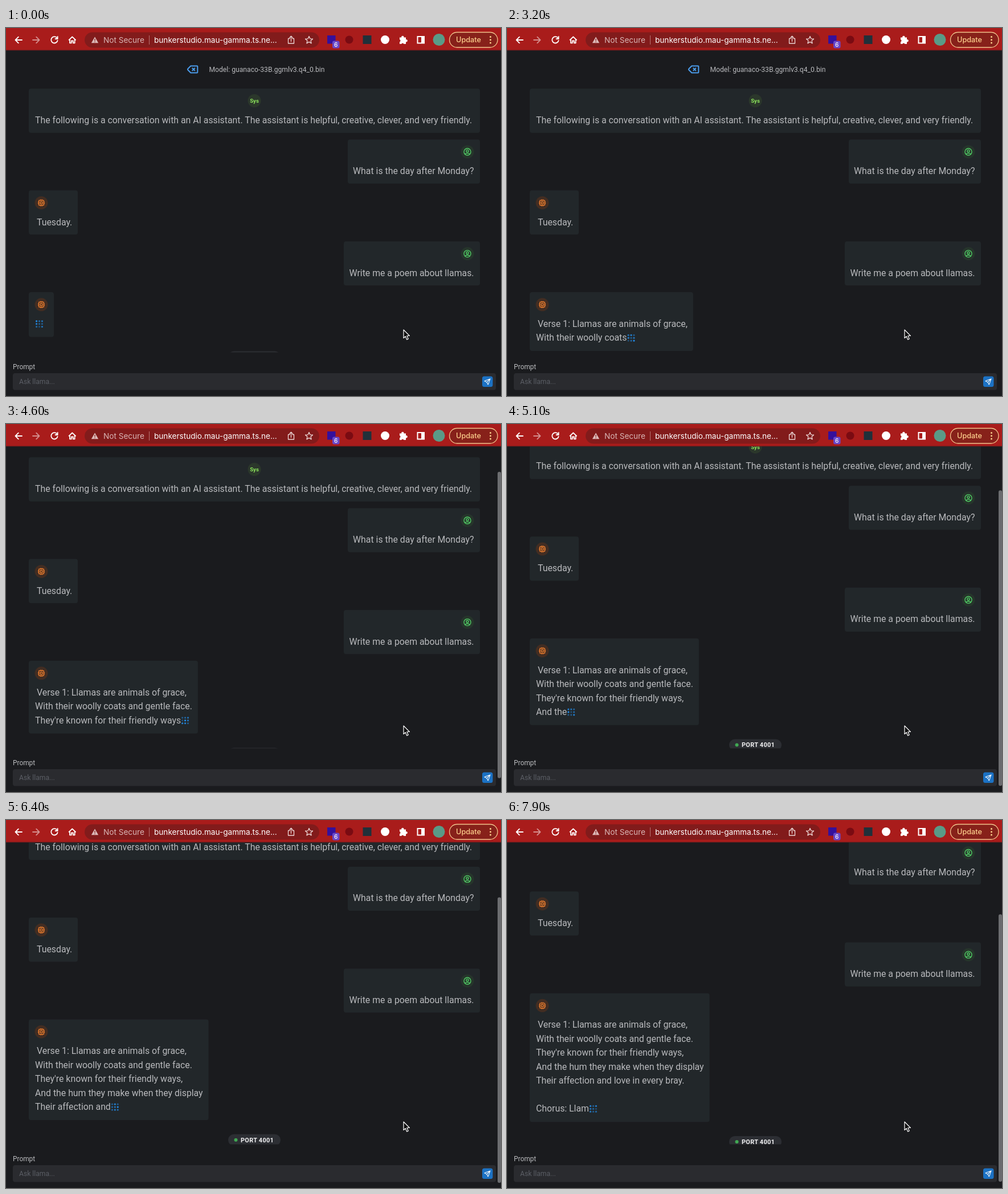
These frames come from a looping animation (869 px wide and 645 px high, 8000 ms). An HTML page:

```html
<!DOCTYPE html>
<html lang="en">
<head>
<meta charset="utf-8">
<title>Chat</title>
<style>
  html, body { margin: 0; width: 100%; height: 100%; overflow: hidden; background: #1a1b1e; }
  svg { display: block; width: 869px; height: 645px; }
  text { font-family: Roboto, "Noto Sans", sans-serif; font-size: 15.84px; fill: #b9babd; }
  .bar text { font-family: Inter, sans-serif; font-size: 13.6px; fill: #fff; }
  .bubble { fill: #22272a; }
  .icon { fill: none; stroke-width: 2; stroke-linecap: round; stroke-linejoin: round; }
  .bar .icon { stroke: #fff; stroke-width: 1.8; }
  .small { font-size: 12.15px; }
</style>
</head>
<body>
<svg viewBox="0 0 869 645">
  <defs>
    <clipPath id="view"><rect y="39" width="869" height="529.5"/></clipPath>
    <g id="user">
      <circle r="11.5" fill="#26352b"/>
      <g class="icon" stroke="#51cf66" transform="scale(.67) translate(-12 -12)">
        <circle cx="12" cy="12" r="9"/><circle cx="12" cy="10" r="3"/>
        <path d="M6.2 18.8A4 4 0 0 1 10 16h4a4 4 0 0 1 3.8 2.9"/>
      </g>
    </g>
    <g id="bot">
      <circle r="11.5" fill="#422d22"/>
      <g class="icon" stroke="#f5822f" transform="scale(.62) translate(-12 -12)">
        <rect x="5" y="5" width="14" height="14" rx="1"/>
        <path d="M9 9h6v6H9zM3 10h2M3 14h2M10 3v2M14 3v2M21 10h-2M21 14h-2M14 21v-2M10 21v-2"/>
      </g>
    </g>
  </defs>

  <rect width="869" height="645" fill="#1a1b1e"/>

  <g clip-path="url(#view)">
    <g id="chat">
      <path class="icon" stroke="#4a9bea" transform="translate(315.3 60.5)"
        d="M20 6a1 1 0 0 1 1 1v10a1 1 0 0 1-1 1H9l-5-5a1.5 1.5 0 0 1 0-2l5-5zM12 10l4 4m0-4l-4 4"/>
      <text class="small" x="356.5" y="76.5">Model: guanaco-33B.ggmlv3.q4_0.bin</text>

      <rect class="bubble" x="40" y="106.3" width="792" height="77.4" rx="4"/>
      <circle cx="436" cy="127.5" r="11.5" fill="#2b372b"/>
      <text x="436" y="131" text-anchor="middle" style="font-size:9.6px;font-weight:700;fill:#8ce65c">Sys</text>
      <text x="51" y="166.7">The following is a conversation with an AI assistant. The assistant is helpful, creative, clever, and very friendly.</text>

      <rect class="bubble" x="600" y="195.5" width="232" height="77.2" rx="4"/>
      <use href="#user" x="810" y="217"/>
      <text x="821.5" y="256.1" text-anchor="end">What is the day after Monday?</text>

      <rect class="bubble" x="40" y="284.6" width="86" height="77.4" rx="4"/>
      <use href="#bot" x="62" y="306.4"/>
      <text x="54" y="345.5">Tuesday.</text>

      <rect class="bubble" x="593" y="374" width="239" height="77.2" rx="4"/>
      <use href="#user" x="810" y="395.6"/>
      <text x="821.5" y="434.8" text-anchor="end">Write me a poem about llamas.</text>

      <rect class="bubble" id="reply" x="40" y="463.1" rx="4"/>
      <use href="#bot" x="62" y="484.8"/>
      <g id="poem"></g>
      <g id="loader" fill="#228be6"></g>

      <g id="badge">
        <rect x="390" width="92" height="20" rx="10" fill="#2c2e33"/>
        <circle cx="403.5" cy="10" r="3" fill="#40a853"/>
        <text x="412" y="13.8" style="font-size:10.9px;font-weight:700;letter-spacing:.3px;fill:#f1f1f2">PORT 4001</text>
      </g>
    </g>
  </g>

  <text x="12" y="597.6" style="font-size:11.9px">Prompt</text>
  <rect x="12" y="605" width="848" height="29.5" rx="4" fill="#2a2b2f"/>
  <text class="small" x="23" y="624" style="fill:#5b5e65">Ask llama...</text>
  <rect x="836" y="610.5" width="18.5" height="18.5" rx="3.5" fill="#1c72c4"/>
  <path class="icon" stroke="#fff" transform="translate(845.2 619.8) scale(.54) translate(-12 -12)"
    d="M10 14L21 3l-6.5 18a.55.55 0 0 1-1 0L10 14l-7-3.5a.55.55 0 0 1 0-1L21 3"/>
  <rect id="thumb" x="863" width="6" rx="3" fill="#6c6d70"/>

  <g class="bar">
    <rect width="869" height="39" fill="#a91c1b"/>
    <rect y="38.5" width="869" height="1" fill="#5e1d1e"/>
    <path class="icon" d="M28 21H16.5m5.3-5.3L16.5 21l5.3 5.3"/>
    <path class="icon" opacity=".5" d="M47 21h11.5m-5.3-5.3l5.3 5.3-5.3 5.3"/>
    <path class="icon" d="M89.6 17.5A5.7 5.7 0 1 0 90.5 22M90.6 15v4h-4"/>
    <path class="icon" d="M110.5 20.8l5.8-5.3 5.8 5.3M112 20v6.3h2.8V22.500h3v3.8h2.800V20"/>
    <rect x="138" y="7.500" width="412" height="27" rx="13.500" fill="#821b1b"/>
    <path d="M156 15.500l6.200 10.800h-12.400z" fill="#dcb9b8"/>
    <path d="M156 19v3.600m0 1.100v1.300" stroke="#821b1b" stroke-width="1.300"/>
    <text x="171" y="25.600" style="fill:#d9b6b5">Not Secure</text>
    <path d="M251.500 13v16" stroke="#b67370"/>
    <text x="260" y="25.600">bunkerstudio.mau-gamma.ts.ne...</text>
    <g class="icon" style="stroke-width:1.300;stroke:#ecd6d5">
      <path d="M498 18.500h-2.500v8.500h10v-8.500H503M500.500 23.500v-9m-2.700 2.500l2.700-2.700 2.700 2.700"/>
      <path d="M532 14.500l1.900 4.300 4.600.400-3.500 3.100 1.100 4.600-4.100-2.500-4.100 2.500 1.100-4.600-3.500-3.100 4.600-.400z"/>
    </g>
    <rect x="564" y="13" width="14.500" height="14.500" fill="#35109b"/>
    <rect x="573" y="22.500" width="12.500" height="13" rx="3" fill="#6947c9"/>
    <text x="579.200" y="32.600" text-anchor="middle" style="font-size:10px;font-weight:500">6</text>
    <circle cx="602.500" cy="20.500" r="7" fill="#7a0b12"/>
    <rect x="626.500" y="13" width="15" height="15" fill="#20303a"/>
    <circle cx="665.500" cy="20.500" r="7.500" fill="#fff"/>
    <path fill="#fff" d="M691 16.500h3.200a2.200 2.200 0 1 1 4.200 0h3.600v3.700a2.200 2.200 0 1 1 0 4.200v3.600h-3.600a2.200 2.200 0 0 0-4.200 0H691v-3.600a2.200 2.200 0 0 0 0-4.200z"/>
    <rect x="722.500" y="15" width="11.500" height="11.500" fill="none" stroke="#fff" stroke-width="2"/>
    <rect x="729" y="15" width="5" height="11.500" fill="#fff"/>
    <circle cx="760" cy="20.500" r="10.500" fill="#5a9a87"/>
    <rect x="778.500" y="7.500" width="84.500" height="26.500" rx="13.200" fill="#87211a" stroke="#f1c48c" stroke-width="1.300"/>
    <text x="790" y="25.300" style="font-size:12.700px;font-weight:500;fill:#fbcd8b">Update</text>
    <g fill="#fbcd8b">
      <circle cx="850.500" cy="15.500" r="1.500"/><circle cx="850.500" cy="20.700" r="1.500"/><circle cx="850.500" cy="25.900" r="1.500"/>
    </g>
  </g>

  <path d="M698 529v14.500l3.200-3 2.400 5.600 2.600-1.100-2.400-5.500h4.600z" fill="#0b0b0c" stroke="#fff" stroke-width="1.200" stroke-linejoin="round"/>
</svg>
<script>
const LOOP = 8000, PITCH = 24.5, REPLY_TOP = 463.1, VIEW = 606;
const NS = "http://www.w3.org/2000/svg";
const $ = id => document.getElementById(id);

function add(parent, tag, attrs) {
  const el = document.createElementNS(NS, tag);
  for (const k in attrs) el.setAttribute(k, attrs[k]);
  return parent.appendChild(el);
}

// Token bursts: start, step, tokens
const bursts = [
  [800, 155, "Verse| 1|:| L|lam|as| are"],
  [1880, 100, " animals| of| grace|,|\n"],
  [2480, 100, "With| their| wo|ol|ly| co"],
  [3180, 105, "ats| and| gent|le| face|."],
  [3960, 78, "\n|They|'|re| known| for| their| friendly| ways"],
  [4690, 100, ",|\n"],
  [4930, 118, "And| the| hum| they| make| when| they| display"],
  [5900, 100, "\n"],
  [6010, 104, "Their| aff|ection| and| love| in| every| br|ay"],
  [6980, 120, ".|\n|\n|Ch|orus"],
  [7590, 100, ":"],
  [7780, 100, " L|lam"]
];
const tokens = bursts.flatMap(([start, step, text]) =>
  text.split("|").map((word, i) => ({ at: start + i * step, word })));

// Smooth scrolls: start, from, to
const scrolls = [[4000, 0, 48], [4900, 48, 96], [6250, 96, 122], [7715, 122, 170]];
const SCROLL_MS = 350, HOLD = 700, FADE = 150;

const lineX = i => i ? 51 : 54;
const lines = Array.from({ length: 7 }, (_, i) =>
  add($("poem"), "text", { x: lineX(i), y: 523.9 + i * PITCH }));

// Phase of each dot, row by row
const dots = [0, 3, 8, 1, 6, 4, 7, 5, 2].map((phase, i) => ({
  phase: phase / 10,
  el: add($("loader"), "circle", { cx: 1.6 + i % 3 * 4.9, cy: 1.6 + Math.floor(i / 3) * 4.9, r: 1.6 })
}));

const clamp = v => Math.max(0, Math.min(1, v));

function draw(t) {
  const text = tokens.filter(k => k.at <= t).map(k => k.word).join("").split("\n");
  const last = text.length - 1;
  let right = 84, end = 51;
  lines.forEach((el, i) => {
    const s = text[i] || "";
    if (el.textContent !== s) el.textContent = s;
    if (!s) return;
    const x = lineX(i) + el.getComputedTextLength();
    if (i === last) end = x;
    right = Math.max(right, x + (i === last ? 21 : 10));
  });

  const height = 78.5 + last * PITCH;
  $("reply").setAttribute("width", right - 40);
  $("reply").setAttribute("height", height);
  $("loader").setAttribute("transform", `translate(${end + 1} ${512.2 + last * PITCH})`);
  $("badge").setAttribute("transform", `translate(0 ${REPLY_TOP + height + 24.8})`);
  for (const { el, phase } of dots) {
    const p = (t / 1000 - phase + 1) % 1;
    el.setAttribute("opacity", 0.4 + 0.6 * Math.abs(1 - 2 * p));
  }

  let y = 0, alpha = 0;
  for (const [start, from, to] of scrolls) {
    if (t < start) break;
    const p = clamp((t - start) / SCROLL_MS);
    y = from + (to - from) * (1 - (1 - p) ** 2);
    alpha = clamp(1 - (t - start - HOLD) / FADE);
  }
  $("chat").setAttribute("transform", `translate(0 ${-y})`);

  const k = VIEW / (VIEW + 24 + last * PITCH);
  $("thumb").setAttribute("y", 41 + y * k);
  $("thumb").setAttribute("height", VIEW * k - 4);
  $("thumb").setAttribute("opacity", alpha);
}

function tick() {
  draw(performance.now() % LOOP);
  requestAnimationFrame(tick);
}
tick();
</script>
</body>
</html>
```
